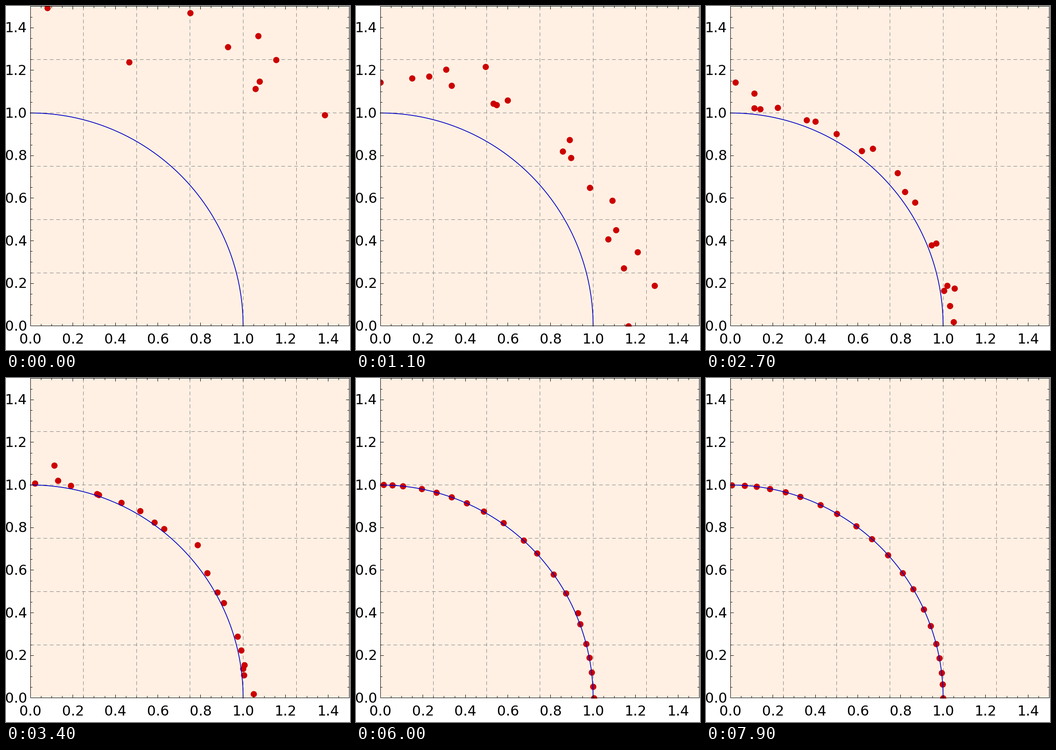
A matplotlib script for the animation above (8 s loop, 749 px wide and 748 px high).

```python
import numpy as np
import matplotlib.pyplot as plt
from matplotlib.animation import FuncAnimation
from matplotlib.collections import LineCollection
from matplotlib.patches import Rectangle

W, H, DPI = 749, 748, 64
PT = 72 / DPI                    # points per pixel
X0, Y0, UNIT = 53, 695.9, 463.3  # plot origin and length of 1.0 in pixels
FRAMES, INTERVAL = 80, 100
DOTS = 20


def to_stage(r, th):
    return np.column_stack([X0 + UNIT * r * np.cos(th), Y0 - UNIT * r * np.sin(th)])


def first_population():
    """Nine dots in view, the others waiting beyond the plot."""
    r, th = np.full(DOTS, 3.0), np.full(DOTS, np.pi / 4)
    seen = np.array([(694, 237), (543, 180), (552, 164), (588, 117), (549, 65),
                     (483, 89), (401, 15), (268, 122), (90, 4)])
    slots = [*range(8, 16), 18]
    x, y = (seen[:, 0] - X0) / UNIT, (Y0 - seen[:, 1]) / UNIT
    r[slots], th[slots] = np.hypot(x, y), np.arctan2(y, x)
    return r, th


def evolve():
    """Dots hop at random; each hop lands nearer the arc and its even spacing."""
    rng = np.random.default_rng(12)
    u = np.linspace(0, 1, DOTS)
    goal = 90 * u - 4.1 * np.sin(2 * np.pi * u)
    r, th = first_population()
    history = [to_stage(r, th)]
    for f in range(1, FRAMES):
        hop = rng.random(DOTS) < 0.1 + 0.4 * np.exp(-f / 20)
        excess = 0.65 * np.exp(-f / 8.5) * rng.uniform(0.5, 1.4, DOTS)
        angle = goal + rng.normal(0, 5 * np.exp(-f / 28), DOTS)
        r = np.where(hop, np.minimum(r, 1 + excess), r)
        th = np.where(hop, np.radians(np.clip(angle, 0, 90)), th)
        history.append(to_stage(r, th))
    return history


def px(v):
    """Center of the pixel that holds v."""
    return np.floor(v) + 0.5


fig = plt.figure(figsize=(W / DPI, H / DPI), dpi=DPI, facecolor="white")
ax = fig.add_axes([0, 0, 1, 1])
ax.set(xlim=(0, W), ylim=(H, 0))
ax.axis("off")

left, bottom = px(X0), px(Y0)
right, top = px(X0 + 1.5 * UNIT), px(Y0 - 1.5 * UNIT)
box = (left, top), right - left, bottom - top

panel = Rectangle(*box, fc="#fff0e3", ec="none", zorder=0)
ax.add_patch(panel)

grid = dict(color="#808080", lw=PT, ls=(0, (8, 6)), dash_capstyle="butt",
            snap=False, zorder=1)
for v in np.arange(1, 6) * 0.25 * UNIT:
    ax.plot([left, right], [px(Y0 - v)] * 2, **grid)
    ax.plot([px(X0 + v)] * 2, [bottom, top], **grid)

history = evolve()
dots = ax.scatter([], [], s=(13.6 * PT) ** 2, c="#cc0000", linewidths=0, zorder=2)
dots.set_clip_path(panel)

arc = to_stage(1, np.linspace(0, np.pi / 2, 200))
ax.plot(*arc.T, color="#0000c8", lw=1.7 * PT, zorder=3)

ticks = []
font = dict(family="DejaVu Sans", size=30.3 * PT, va="baseline")
for i in range(30):
    v = i * 0.05 * UNIT
    x, y = px(X0 + v), px(Y0 - v)
    n = 4 if i % 4 else 7
    ticks += [[(x, bottom), (x, bottom - n)], [(x, top), (x, top + n)],
              [(left, y), (left + n, y)], [(right, y), (right - n, y)]]
    if i % 4 == 0:
        label = f"{i * 0.05:.1f}"
        ax.text(X0 + v, 734, label, ha="center", **font)
        ax.text(46, Y0 - v + 10, label, ha="right", **font)
ax.add_collection(LineCollection(ticks, colors="black", linewidths=PT,
                                 snap=False, zorder=4))
ax.add_patch(Rectangle(*box, fill=False, ec="black", lw=PT, snap=False, zorder=4))


def update(frame):
    dots.set_offsets(history[frame])
    return dots,


anim = FuncAnimation(fig, update, frames=FRAMES, interval=INTERVAL,
                     repeat=True, repeat_delay=0)
plt.show()
```
